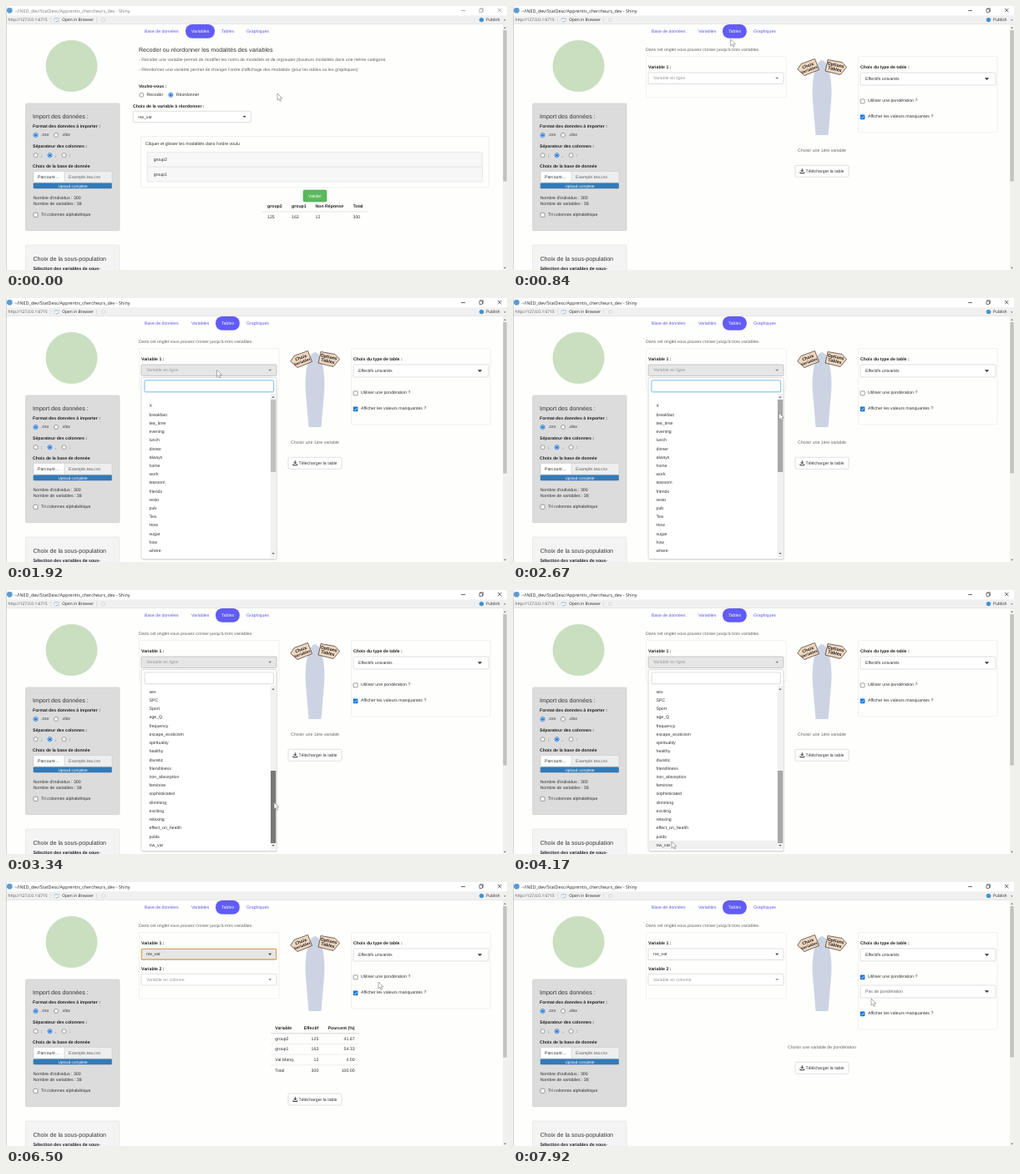
An HTML page that plays this animation: 600x317 px, repeating every 8 s.

```html
<!DOCTYPE html>
<html lang="fr">
<head>
<meta charset="utf-8">
<title>Shiny</title>
<style>
  html, body { margin: 0; width: 100%; height: 100%; overflow: hidden; background: #fefefd; }
  svg { display: block; width: 100vw; height: 100vh; }
  text { font: 5.21px "Liberation Sans", Arial, sans-serif; fill: #333; text-rendering: geometricPrecision; white-space: pre; }
  .b { font-weight: bold; fill: #222; }
  .h { font-size: 7.1px; }
  .muted { fill: #666; }
  .hint { fill: #999; }
  .link { fill: #5c58f0; }
  .white { fill: #fff; }
  .small { font-size: 4.7px; }
  .ui { font: 4.85px "Open Sans", "Noto Sans", sans-serif; fill: #222; }
  .title { font-size: 5.38px; }
  .address { fill: #555; }
  .sign { font: bold 5.2px "Open Sans", sans-serif; fill: #2b2320; }
  .narrow { font-size: 4.4px; }
</style>
</head>
<body>
<svg id="stage" viewBox="0 0 600 317"></svg>
<script>
const LOOP = 8000;
const EVENT = { tab: 500, open: 1920, drag: 2720, pick: 4500, table: 4670, weight: 6920 };

// Pointer tip: time, x, y
const POINTER = [
  [0, 325, 105], [90, 323, 102], [420, 266, 31], [600, 265, 31], [1420, 243.5, 74],
  [1840, 252, 86], [2080, 254, 88], [2600, 318.5, 138], [2720, 318.5, 138], [3340, 321, 255],
  [3680, 320, 257], [4170, 190, 302], [4600, 190, 302], [5170, 317, 197], [5800, 322, 194],
  [6500, 446, 120], [6840, 419, 113], [7100, 419, 113], [7700, 429, 140], [8000, 429, 140]
];

const ITEMS = ('X breakfast tea_time evening lunch dinner always home work tearoom friends resto pub Tea How ' +
  'sugar how where price age sex SPC Sport age_Q frequency escape_exoticism spirituality healthy diuretic ' +
  'friendliness iron_absorption feminine sophisticated slimming exciting relaxing effect_on_health poids nw_var').split(' ');
const ROW = 10.22, MAX_SCROLL = 212;

const clamp = (v, lo, hi) => Math.min(hi, Math.max(lo, v));

function pointerAt(t) {
  const i = Math.max(1, POINTER.findIndex(p => p[0] > t));
  const [t0, x0, y0] = POINTER[i - 1], [t1, x1, y1] = POINTER[i];
  const u = (t - t0) / (t1 - t0), e = u * u * (3 - 2 * u);
  return { x: x0 + (x1 - x0) * e, y: y0 + (y1 - y0) * e };
}

// Drawing helpers
const text = (x, y, str, cls = '', anchor = 'start') =>
  `<text x="${x}" y="${y}" class="${cls}" text-anchor="${anchor}">${str}</text>`;
const box = (x, y, x2, y2, fill, stroke = 'none', r = 0, w = .6) =>
  `<rect x="${x}" y="${y}" width="${x2 - x}" height="${y2 - y}" rx="${r}" fill="${fill}" stroke="${stroke}" stroke-width="${w}"/>`;
const path = (d, stroke, w = .6, fill = 'none') =>
  `<path d="${d}" fill="${fill}" stroke="${stroke}" stroke-width="${w}"/>`;
const rule = (x, x2, y, color = '#ddd', w = .5) => path(`M${x} ${y}H${x2}`, color, w);
const disc = (x, y, r, fill, stroke = 'none', w = .7) =>
  `<circle cx="${x}" cy="${y}" r="${r}" fill="${fill}" stroke="${stroke}" stroke-width="${w}"/>`;
const arrow = (x, y, color = '#333', s = 2, dir = 1) =>
  path(`M${x - s} ${y - dir * s / 2}h${2 * s}l${-s} ${dir * s * 1.1}z`, 'none', 0, color);

const radio = (x, y, on) => on
  ? disc(x, y, 2.5, '#fff', '#1673d6', .9) + disc(x, y, 1.5, '#1673d6')
  : disc(x, y, 2.5, '#fff', '#777');
const checkbox = (x, y, on) => on
  ? box(x, y, x + 5.6, y + 5.6, '#1673d6', 'none', .9) + path(`M${x + 1.2} ${y + 2.9}l1.2 1.2 2.1 -2.6`, '#fff', .8)
  : box(x + .3, y + .3, x + 5.3, y + 5.3, '#fff', '#777', .7, .7);

function select(x, y, x2, y2, label, { cls = '', fill = '#fff', stroke = '#ccc', caret = '#333', inset = 7.8 } = {}) {
  const mid = (y + y2) / 2;
  return box(x, y, x2, y2, fill, stroke, 1.4) + text(x + 6, mid + 1.7, label, cls) + arrow(x2 - inset, mid, caret, inset / 4);
}

function windowChrome(active) {
  const ink = active ? '#222' : '#888';
  return box(0, 0, 600, 11.5, '#fff') + box(0, 11.5, 600, 21.5, '#f0f0f0') + rule(0, 600, 21.6, '#d4d4d4') +
    disc(4.3, 5.3, 3.4, '#5b9bd3') +
    `<g opacity="${active ? 1 : .6}">${text(10, 7.6, '~/INED_dev/StatDesc/Apprentis_chercheurs_dev - Shiny', 'ui title')}</g>` +
    rule(545, 550, 5.6, ink, .7) + box(567, 3.8, 570.6, 7.4, 'none', ink) + path('M568 3.8v-1h3.6v3.6h-1', ink, .5) +
    path('M589 3l4.4 4.4M593.4 3l-4.4 4.4', ink, .7) +
    text(2.5, 18.4, 'http://127.0.0.1:6715', 'ui address') + path('M53.5 13.5v6M108.5 13.5v6', '#ccc', .5) +
    box(58, 14.5, 63.3, 18.8, '#fff', '#b4c0cc', .5) + rule(58, 63.3, 15.3, '#9dbbd8', .7) +
    path('M60 19.3l2.6 -2.2', '#7ca4cc', .7) + text(67.3, 18.4, 'Open in Browser', 'ui') +
    disc(116.5, 16.6, 2.1, 'none', '#d5d9dc', .9) +
    disc(569.5, 16.6, 2.7, '#3d93d2') + text(575, 18.4, 'Publish', 'ui') + arrow(597.3, 17, '#444', 1.2) +
    box(595, 22, 600, 317, '#f1f1f1') + box(595.4, 29, 599.7, 210.5, '#c1c1c1') +
    arrow(597.5, 26, '#555', 1.4, -1) + arrow(597.5, 314.5, '#555', 1.4) + path('M.3 0V317', '#aaa', .6);
}

function sidebar() {
  return disc(78.5, 72, 31, '#c9dfbf') +
    box(23.5, 117, 136, 269.7, '#dcdcdc', '#c9c9c9', 1.5) +
    text(32, 135.2, 'Import des données :', 'h') +
    text(32, 146.2, 'Format des données à importer :', 'b') +
    radio(35.5, 155, true) + text(42, 156.2, '.csv') + radio(60, 155) + text(66.5, 156.2, '.xlsx') +
    text(32, 170, 'Séparateur des colonnes :', 'b') +
    radio(35.5, 179.2) + text(42, 180.6, ';') + radio(52.5, 179.2, true) + text(59, 180.6, ',') +
    radio(69.5, 179.2) + text(76, 180.6, ':') +
    text(32, 193.8, 'Choix de la base de donnée', 'b') +
    box(33, 198.5, 127, 212, '#eee', '#ccc', 1.2) + box(33, 198.5, 70, 212, '#fff', '#ccc', 1.2) +
    text(38, 207.2, 'Parcourir...') + text(75, 207.2, 'Example.tea.csv', 'muted') +
    box(32.7, 212.4, 126.8, 219.3, '#337ab7', 'none', 1.2) + text(80, 217.5, 'Upload complete', 'white small', 'middle') +
    text(32.5, 231.8, "Nombre d'individus : 300") + text(32.5, 239.4, 'Nombre de variables : 38') +
    checkbox(32.7, 248, false) + text(42, 251.6, 'Tri colonnes alphabétique') +
    box(23.5, 287, 136, 330, '#f4f4f4', '#e0e0e0', 1.5) +
    text(32.5, 305.6, 'Choix de la sous-population', 'h') +
    text(32.5, 316.6, 'Sélection des variables de sous-', 'b');
}

function tabs(active) {
  return [['Base de données', 166], ['Variables', 222], ['Tables', 258], ['Graphiques', 288]].map(([name, x]) => {
    const on = name === active, right = name === 'Tables' ? 279.8 : 250;
    return (on ? box(x - 7, 21.9, right, 38.8, '#625cf6', 'none', 8) : '') + text(x, 32, name, on ? 'white' : 'link');
  }).join('');
}

function variablesPage() {
  const columns = [['group2', 313, 125], ['group1', 342, 163], ['Non Réponse', 370.5, 12], ['Total', 415.5, 300]];
  return text(159, 55, 'Recoder ou réordonner les modalités des variables', 'h') +
    text(159, 66, '- Recoder une variable permet de modifier les noms de modalités et de regrouper plusieurs modalités dans une même catégorie.', 'muted') +
    text(159, 78, "- Réordonner une variable permet de changer l'ordre d'affichage des modalités (pour les tables ou les graphiques)", 'muted') +
    text(159, 98, 'Voulez-vous :', 'b') +
    radio(162.3, 106.8) + text(168.5, 107.8, 'Recoder') + radio(197.3, 106.8, true) + text(203.8, 107.8, 'Réordonner') +
    text(152, 122, 'Choix de la variable à réordonner :', 'b') +
    select(152.3, 126.3, 293.3, 139.6, 'nw_var') +
    box(161.5, 156.5, 578.5, 218, 'none', '#e6e6e6', 1) +
    text(167, 167, "Cliquer et glisser les modalités dans l'ordre voulu") +
    box(169, 175.5, 570.5, 193.2, '#f7f7f7', '#ddd', 1) + text(176.7, 186, 'group2') +
    box(169, 193.2, 570.5, 211, '#f7f7f7', '#ddd', 1) + text(176.7, 203.8, 'group1') +
    box(356, 221, 384, 235, '#5cb85c', '#4cae4c', 1.5) + text(370, 229.7, 'Valider', 'white', 'middle') +
    columns.map(([name, x, n]) => text(x, 242, name, 'b') + text(x, 255.2, n)).join('') +
    rule(307, 433, 247, '#ccc');
}

function guide() {
  return path('M370 65C378 66 383 90 381 114L377.5 155H362.5L359 114C357 90 362 66 370 65Z', 'none', 0, '#ccd4e4') +
    path('M340.8 76L345 69.5 361.5 63.5 366.5 76.5 349 83.5Z', '#3b302b', .7, '#efd8c0') +
    path('M377 64.5L394 67.5 399.5 73.5 392 82.5 374 78Z', '#3b302b', .7, '#efd8c0') +
    `<g transform="translate(354 74) rotate(-20)">${text(0, -.8, 'Choix', 'sign', 'middle')}${text(-.2, 4.1, 'Variables', 'sign narrow', 'middle')}</g>` +
    `<g transform="translate(386 73) rotate(12)">${text(0, -.6, 'Options', 'sign', 'middle')}${text(0, 4.6, 'Tables', 'sign', 'middle')}</g>`;
}

const download = y => box(338, y, 402, y + 14, '#fff', '#ccc', 1.5) +
  path(`M346.3 ${y + 4}v3.4M344.7 ${y + 6}l1.6 1.8 1.6 -1.8M343.9 ${y + 8}v1.5h4.8v-1.5`, '#333', 1) +
  text(350.5, y + 8.8, 'Télécharger la table');

function resultTable() {
  const rows = [['group2', 125, '41.67'], ['group1', 163, '54.33'], ['Val.Manq.', 12, '4.00'], ['Total', 300, '100.00']];
  const line = (cells, y, cls) => text(322.3, y, cells[0], cls) + text(374.3, y, cells[1], cls, 'end') + text(417.6, y, cells[2], cls, 'end');
  return line(['Variable', 'Effectif', 'Pourcent (%)'], 177.2, 'b') + rule(317, 423, 181.8, '#ccc', .8) +
    rows.map((r, i) => line(r, 189.7 + 12.65 * i) + (i ? rule(317, 423, 181.8 + 12.65 * i, '#ddd') : '')).join('');
}

function dropdown(t, pointer) {
  const travel = t < EVENT.drag ? 0 : t < 3340 ? clamp((pointer.y - 138) / 95, 0, 1) : 1;
  const scroll = travel * MAX_SCROLL, thumb = 122 + travel * 95;
  const searching = t < EVENT.drag, dragging = !searching && t < 3600;
  const hovered = !dragging && pointer.x < 316 ? Math.floor((pointer.y - 124.4 + scroll) / ROW) : -1;
  const thumbColor = dragging ? '#787878' : t >= 2500 ? '#a8a8a8' : '#c1c1c1';
  const rows = ITEMS.map((name, i) => {
    const y = 131.4 + i * ROW - scroll;
    return (i === hovered ? box(162.5, y - 7, 316.5, y + 3.2, '#f0f0f0') : '') + text(171.5, y, name);
  }).join('');
  return box(162.8, 97, 324.8, 315.3, '#0001', 'none', 2) + box(162, 95.5, 324, 313.5, '#fff', '#c4c4c4', 1.5) +
    (searching ? box(166, 98.9, 320.5, 112.7, '#fff', '#d6eaf8', 1.8, 2) : '') +
    box(166, 98.9, 320.5, 112.7, '#fff', searching ? '#66afe9' : '#ccc', 1.5, .7) +
    `<g clip-path="url(#list)">${rows}</g>` +
    box(316.5, 115, 323.5, 311, '#f1f1f1') + box(317, thumb, 323.2, thumb + 87, thumbColor) +
    arrow(320, 119, '#555', 1.6, -1) + arrow(320, 306.8, '#555', 1.6);
}

function tablesPage(t, pointer) {
  const open = t >= EVENT.open && t < EVENT.pick, picked = t >= EVENT.pick;
  const ready = t >= EVENT.table, weighted = t >= EVENT.weight;
  const focused = picked && !weighted, pressed = open || focused;
  const shift = weighted ? 25 : 0;
  const empty = { cls: 'hint', caret: '#888' };
  const look = { ...(picked ? {} : empty), ...(pressed ? { fill: '#e6e6e6', stroke: '#adadad' } : {}) };
  let out = text(159, 53.6, "Dans cet onglet vous pouvez croiser jusqu'à trois variables.", 'muted') +
    box(159.5, 60.5, 327, ready ? 140 : 109.7, 'none', '#e8e8e8', 1) +
    text(162, 75, 'Variable 1 :', 'b') +
    select(162, 80, 324, 93.5, picked ? 'nw_var' : 'Variable en ligne', look);
  if (focused) out += box(162.5, 80.5, 323.5, 92.9, 'none', '#e3ac55', .8, 1.1);
  if (ready) out += text(162, 106, 'Variable 2 :', 'b') + select(162, 110.3, 324, 124, 'Variable en colonne', empty);
  out += guide() + box(413.5, 60.5, 580, 152 + shift, 'none', '#e8e8e8', 1) +
    text(416, 75, 'Choix du type de table :', 'b') + select(416, 80, 578, 95, 'Effectifs univariés', { inset: 10.5 }) +
    checkbox(415.8, 111.6, weighted) + text(425, 115, 'Utiliser une pondération ?') +
    checkbox(415.8, 130.6 + shift, true) + text(425, 134 + shift, 'Afficher les valeurs manquantes ?');
  if (weighted) out += select(416, 124, 578, 139, 'Pas de pondération', { cls: 'muted', inset: 10.5 }) +
    text(370, 199.8, 'Choisir une variable de pondération', 'muted', 'middle') + download(216.3);
  else if (ready) out += resultTable() + download(254);
  else out += text(370, 174.8, 'Choisir une 1ère variable', 'muted', 'middle') + download(191.3);
  return out + (open ? dropdown(t, pointer) : '');
}

const cursor = ({ x, y }) =>
  path(`M${x} ${y}v8.2l1.9 -1.8 1.3 3 1.4 -.6 -1.3 -2.9h2.6z`, '#777', .6, '#fff');

function scene(t) {
  const pointer = pointerAt(t), switched = t >= EVENT.tab;
  return '<defs><clipPath id="list"><rect x="162" y="115" width="154.5" height="196"/></clipPath></defs>' +
    box(0, 0, 600, 317, '#fefefd') + sidebar() + tabs(switched ? 'Tables' : 'Variables') +
    (switched ? tablesPage(t, pointer) : variablesPage()) + windowChrome(switched) + cursor(pointer);
}

// Twelve steps per second; every sixth one is held from the previous step.
function stepAt(t) {
  const k = Math.floor(Math.floor(t / 10) * 12 / 100);
  return k % 6 === 3 ? k - 1 : k;
}

const stage = document.getElementById('stage');
const start = performance.now();
let shown = -1;
function frame() {
  const step = stepAt((performance.now() - start) % LOOP);
  if (step !== shown) {
    shown = step;
    stage.innerHTML = scene(Math.ceil(step * 100 / 12) * 10);
  }
  requestAnimationFrame(frame);
}
frame();
</script>
</body>
</html>
```
